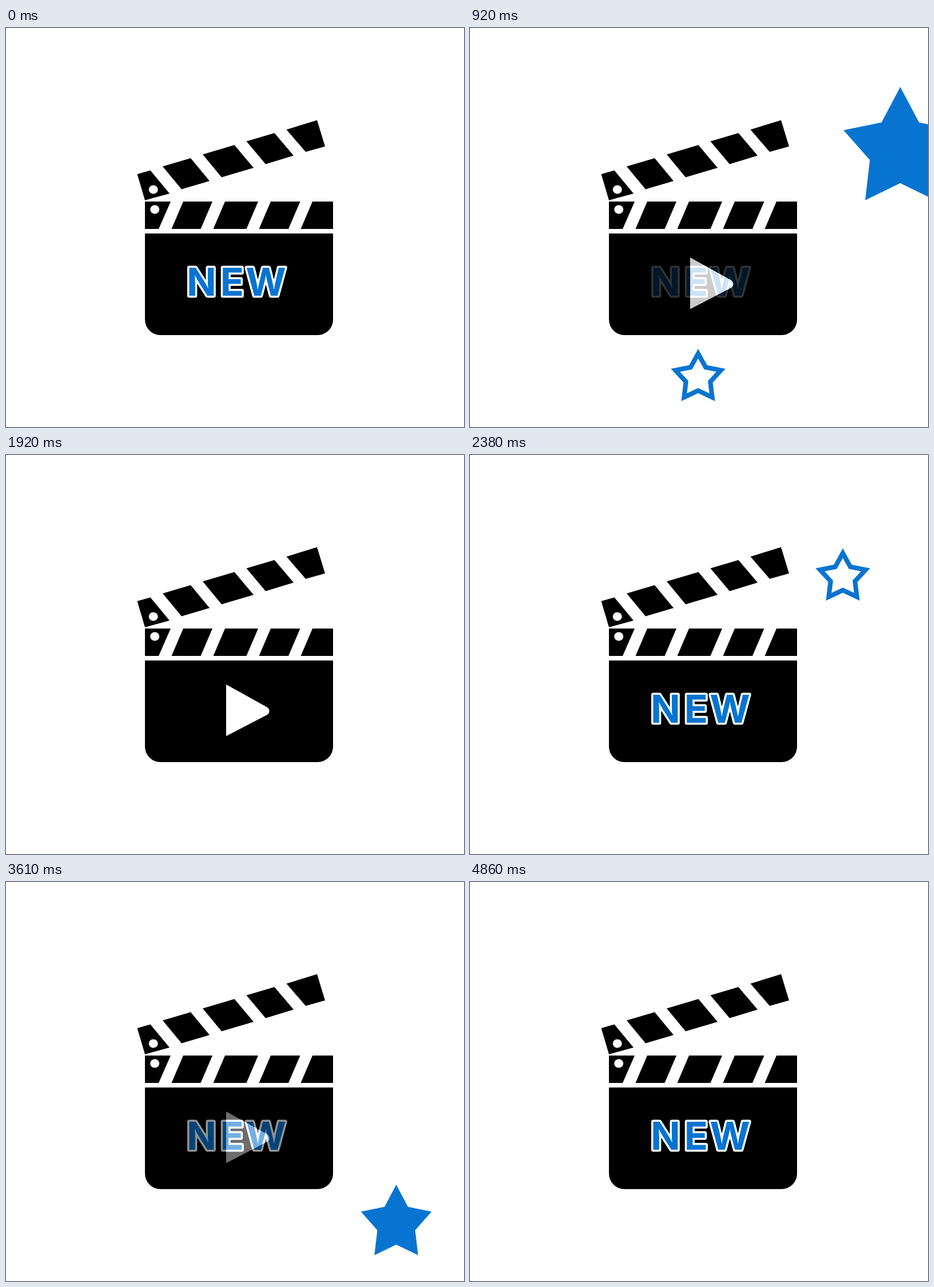
These frames come from a looping animation (801x699 px, 4.89 s). An HTML page:

```html
<!DOCTYPE html>
<html lang="en">
<head>
<meta charset="utf-8">
<title>New video</title>
<style>
  html, body { margin: 0; width: 100%; height: 100%; overflow: hidden; background: #fff; }
  svg { display: block; width: 100%; height: 100%; }
  text { font: 700 68px Inter, sans-serif; text-anchor: middle; }
</style>
</head>
<body>
<svg viewBox="0 0 801 699">
  <g id="clapper">
    <path d="M229.5 256L252.5 249.5L286 290L243 301.8Z
      M274 242.5L323 228L356 268L307 282.5Z
      M344 221.5L399.5 205L433 245L377 261.5Z
      M420.5 198.5L469.5 184L503 223.5L454 238.5Z
      M490.5 178L544 161.5L558 207.5L524 217Z"/>
    <path d="M243 304H288L267 352H243Z
      M310 304H361L340.5 352H289.5Z
      M383 304H441L420.5 352H362.5Z
      M463 304H514.5L494 352H442.5Z
      M536 304H572V352H515.5Z"/>
    <path d="M243 360H572V511A27 27 0 0 1 545 538H270A27 27 0 0 1 243 511Z"/>
    <ellipse cx="257.7" cy="283" rx="8" ry="7.6" fill="#fff"/>
    <ellipse cx="260.2" cy="317.8" rx="8" ry="7.6" fill="#fff"/>
  </g>
  <text x="342 395.5 454.5" y="469.3" fill="#0874d1" stroke="#fff" stroke-width="7"
    stroke-linejoin="round" paint-order="stroke">NEW</text>
  <g id="play">
    <rect x="300" y="395" width="210" height="105"/>
    <path d="M385 402L456.5 441.7Q460.5 444.3 460.5 448.5Q460.5 452.8 456.5 455.2L385 492.5Z" fill="#fff"/>
  </g>
  <g id="stars" fill="#0874d1" fill-rule="evenodd"></g>
</svg>
<script>
const LOOP = 4890;

// One star outline: centre, radii, and inner-to-outer ratio
function starPath(cx, cy, rx, ry) {
  let d = '';
  for (let i = 0; i < 10; i++) {
    const a = i * Math.PI / 5, k = i % 2 ? 0.536 : 1;
    d += (i ? 'L' : 'M') + (cx + rx * k * Math.sin(a)).toFixed(2) +
      ' ' + (cy - ry * k * Math.cos(a)).toFixed(2);
  }
  return d + 'Z';
}

// Filled star fitting a square box of the given size
function solid(x, y, size) {
  const ry = (size - 0.5) / 1.809;
  return starPath(x + size / 2, y + 0.3 + ry, (size - 0.5) / 1.902, ry);
}

// Star ring inside a 96 by 92 box
function ring(x, y) {
  const cx = x + 48, cy = y + 50.7;
  return starPath(cx, cy, 50.2, 50.6) + starPath(cx, cy, 33.5, 33.7);
}

// Path, time on, time off
const stars = [
  [solid(96, 79, 124), 330, 920],
  [ring(351, 562), 560, 1180],
  [solid(653, 103, 199), 830, 1450],
  [solid(45, 474, 147), 1280, 1920],
  [ring(604, 163.5), 2380, 3050],
  [solid(35, 340, 147), 2780, 3420],
  [solid(620.5, 530, 124), 3120, 3730],
  [solid(49, 53, 199), 3640, 4270],
  [ring(56, 54), 3900, 4570],
  [solid(594.5, 198, 147), 4100, 4740]
].map(([d, on, off]) => {
  const el = document.createElementNS('http://www.w3.org/2000/svg', 'path');
  el.setAttribute('d', d);
  document.getElementById('stars').append(el);
  return { el, on, off };
});

// Crossfades between the word and the play sign: start, steps, final opacity of the sign
const fades = [[560, 15, 1], [1920, 13, 0], [3520, 7, 1], [4740, 4, 0]];
const STEP = 30;
const play = document.getElementById('play');

function playOpacity(t) {
  let p = 0;
  for (const [start, steps, to] of fades) {
    if (t < start) break;
    const k = Math.min(1, Math.floor((t - start) / STEP) / steps);
    p = to ? k : 1 - k;
  }
  return p;
}

function draw(now) {
  const t = now % LOOP;
  play.setAttribute('opacity', playOpacity(t));
  for (const { el, on, off } of stars) {
    el.setAttribute('visibility', t >= on && t < off ? 'visible' : 'hidden');
  }
}

function tick() {
  draw(performance.now());
  requestAnimationFrame(tick);
}
draw(0);
requestAnimationFrame(tick);
</script>
</body>
</html>
```
